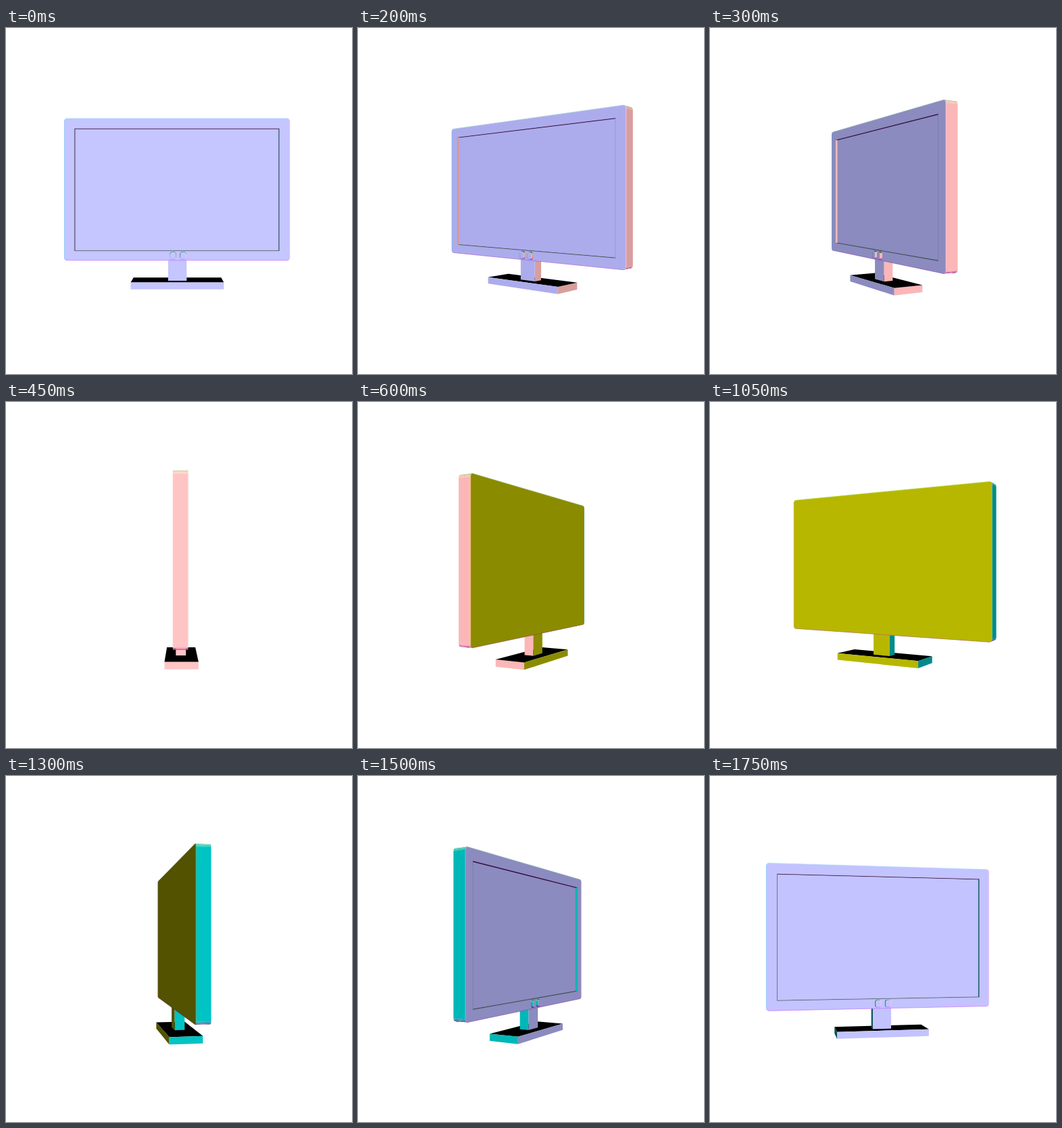
An HTML page that plays this animation: 512x512 px, repeating every 1800 ms.

```html
<!DOCTYPE html>
<html lang="en">
<head>
<meta charset="utf-8">
<title>Turning monitor</title>
<style>
  html, body { margin: 0; width: 100%; height: 100%; overflow: hidden; background: #fff; }
  svg { display: block; width: 100vw; height: 100vh; }
</style>
</head>
<body>
<svg id="stage" viewBox="0 0 512 512"></svg>
<script>
const stage = document.getElementById('stage');
const CENTER_X = 256.4, CENTER_Y = 255.8, CAMERA = 734;
const STEP_MS = 50, STEPS = 36;
let cos = 1, sin = 0;

const turn = ([x, y, z]) => [x * cos - z * sin, y, x * sin + z * cos];

function project(point) {
  const [x, y, z] = turn(point);
  const scale = CAMERA / (CAMERA - z);
  return (CENTER_X + x * scale).toFixed(2) + ',' + (CENTER_Y - y * scale).toFixed(2);
}

const projectAll = points => points.map(project).join(' ');

function facesCamera(point, normal) {
  const [x, y, z] = turn(point), [nx, ny, nz] = turn(normal);
  return -x * nx - y * ny + (CAMERA - z) * nz > 0;
}

// The hue follows the model normal, the brightness follows the camera.
function shade(normal, minLight = 0) {
  const light = Math.sqrt(Math.max(minLight, turn(normal)[2]));
  const channels = normal.map(n => Math.min(255, Math.round(270 * light * ((n + 1) / 2) ** 0.455)));
  return `rgb(${channels})`;
}

function face(points, normal, { minLight = 0, stroke = 0 } = {}) {
  if (!facesCamera(points[0], normal)) return '';
  const color = shade(normal, minLight);
  return `<polygon points="${projectAll(points)}" fill="${color}" stroke="${color}" stroke-width="${stroke}"/>`;
}

const atDepth = (outline, z) => outline.map(([x, y]) => [x, y, z]);

// Calls visit(start, end, outward normal) for every edge of a counter-clockwise outline.
function mapEdges(outline, visit) {
  return outline.map((a, i) => {
    const b = outline[(i + 1) % outline.length];
    const length = Math.hypot(b[0] - a[0], b[1] - a[1]);
    return visit(a, b, [(b[1] - a[1]) / length, (a[0] - b[0]) / length, 0]);
  }).join('');
}

const wall = (a, b, back, front) => [[...a, back], [...b, back], [...b, front], [...a, front]];

function solid(outline, back, front, style) {
  return mapEdges(outline, (a, b, n) => face(wall(a, b, back, front), n, style)) +
    face(atDepth(outline, front), [0, 0, 1]) +
    face(atDepth(outline, back), [0, 0, -1]);
}

function bevel(outline, z, side) {
  const cap = [0, 0, side];
  if (!facesCamera([...outline[0], z], cap)) return '';
  const capLight = turn(cap)[2];
  return mapEdges(outline, (a, b, [nx, ny]) => {
    const color = shade([nx * Math.SQRT1_2, ny * Math.SQRT1_2, side * Math.SQRT1_2], capLight);
    return `<polyline points="${projectAll([[...a, z], [...b, z]])}" fill="none" stroke="${color}" stroke-width=".7"/>`;
  });
}

function recess(outline, back, front) {
  if (!facesCamera([...outline[0], front], [0, 0, 1])) return '';
  const rim = projectAll(atDepth(outline, front));
  const walls = mapEdges(outline, (a, b, [nx, ny]) =>
    face(wall(a, b, back, front), [-nx, -ny, 0], { minLight: 0.06, stroke: 0.4 }));
  return `<clipPath id="rim"><polygon points="${rim}"/></clipPath>` +
    `<polygon points="${rim}" fill="none" stroke="#335" stroke-opacity=".2" stroke-width=".8"/>` +
    `<g clip-path="url(#rim)">${walls}</g>`;
}

const rect = (left, bottom, right, top) => [[left, bottom], [right, bottom], [right, top], [left, top]];

function roundedRect(left, bottom, right, top, r, segments = 4) {
  const corners = [[right - r, bottom + r], [right - r, top - r], [left + r, top - r], [left + r, bottom + r]];
  return corners.flatMap(([x, y], quarter) => Array.from({ length: segments + 1 }, (_, i) => {
    const angle = (quarter - 1 + i / segments) * Math.PI / 2;
    return [x + r * Math.cos(angle), y + r * Math.sin(angle)];
  }));
}

const FRONT = 7.5, BACK = -10.3, BUTTON_FRONT = 11;
const foot = rect(-70, -127.4, 64.2, -117.5);
const neck = rect(-16.4, -117.5, 10.9, -84);
const casing = roundedRect(-168.3, -87.1, 161.9, 121, 4);
const panel = rect(-153.4, -73.2, 146.5, 105.9);
const buttons = [-9.2, 5.6].map(x => roundedRect(x - 4, -85, x + 4, -75, 2.5, 3));

const button = outline =>
  solid(outline, FRONT, BUTTON_FRONT, { minLight: 0.06, stroke: 0.6 }) + bevel(outline, BUTTON_FRONT, 1);

function draw(time) {
  const step = Math.floor(time / STEP_MS) % STEPS;
  const angle = step / STEPS * 2 * Math.PI;
  cos = Math.cos(angle);
  sin = Math.sin(angle);

  const frontVisible = facesCamera([0, 0, FRONT], [0, 0, 1]);
  stage.innerHTML =
    solid(foot, -26, 20) +
    solid(neck, -9.7, 5) +
    solid(casing, BACK, FRONT) +
    bevel(casing, FRONT, 1) +
    bevel(casing, BACK, -1) +
    recess(panel, 4, FRONT) +
    (frontVisible ? buttons.map(button).join('') : '');
}

const start = performance.now();
function tick() {
  draw(performance.now() - start);
  requestAnimationFrame(tick);
}
tick();
</script>
</body>
</html>
```
